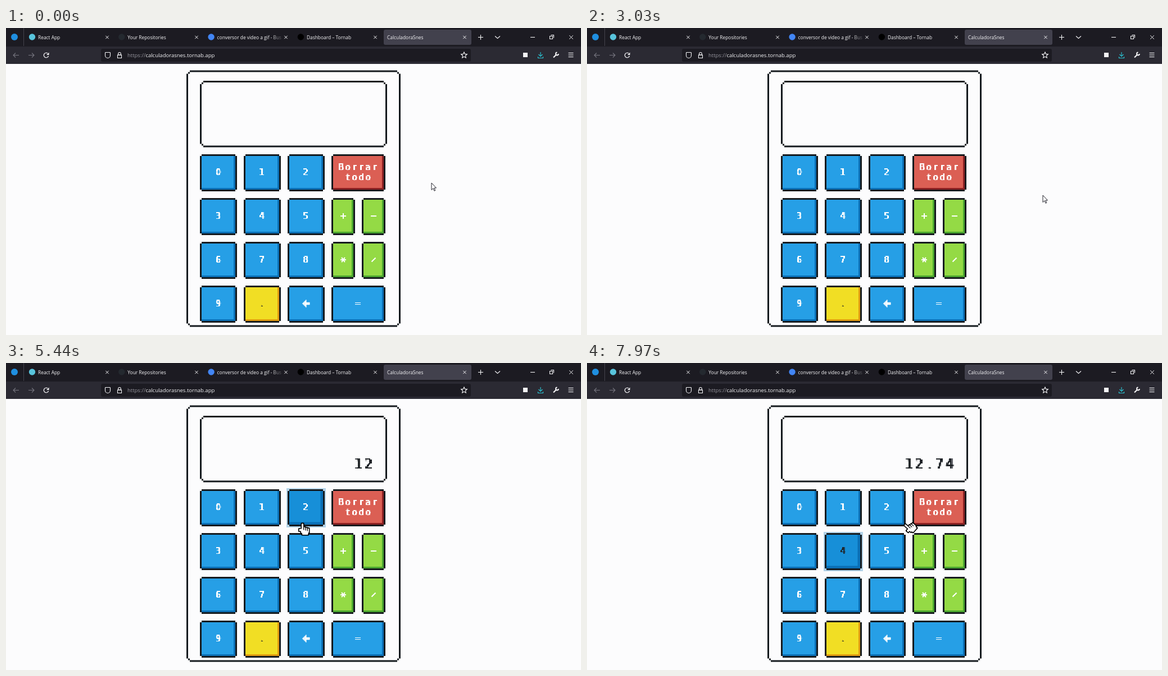
Write an HTML page with a canvas that moves like this. It is 1023x547 px and loops after 8 s.

```html
<!DOCTYPE html>
<html lang="es">
<head>
<meta charset="utf-8">
<title>Calculadora</title>
<style>
  html, body { margin: 0; width: 100%; height: 100%; overflow: hidden; background: #fcfcfd; }
  canvas { display: block; }
</style>
</head>
<body>
<canvas id="stage" width="1023" height="547"></canvas>
<script>
const ctx = document.getElementById('stage').getContext('2d');
const LOOP = 8000;
const INK = '#151a1e';
const DARK = '#212529';
const PALE = '#f4f4f6';

const THEMES = {
  blue: { fill: '#269fe6', hover: '#178fd8', shade: '#0a6fb5', halo: '#b3d3e9', text: '#fff' },
  red: { fill: '#db5f54', hover: '#ce5347', shade: '#8c2022', halo: '#e4c0bd', text: '#fff' },
  green: { fill: '#94da45', hover: '#7fc63a', shade: '#4aa52e', halo: '#c9e4c0', text: '#fff' },
  yellow: { fill: '#f1de24', hover: '#efc90f', shade: '#e09a10', halo: '#f6e3ba', text: DARK }
};

// Operators are bars through the centre, at these angles in degrees.
const BARS = { '+': [0, 90], '-': [0], '*': [0, 55, 125], '/': [-45] };

const PITCH = 78;
const SIZE = 66;
const buttons = [];
function addButton(label, col, row, theme = 'blue', w = SIZE) {
  buttons.push({ label, x: 345 + PITCH * col, y: 225 + PITCH * row, w, h: SIZE, theme });
}
for (let n = 0; n < 10; n++) addButton(String(n), n % 3, Math.floor(n / 3));
addButton('.', 1, 3, 'yellow');
addButton('←', 2, 3);
addButton('=', 3, 3, 'blue', 96);
addButton('Borrar todo', 3, 0, 'red', 96);
[...'+-*/'].forEach((op, i) => {
  addButton(op, 3 + (i % 2) * 54 / PITCH, 1 + Math.floor(i / 2), 'green', 42);
});

// Pointer stops: time, place and the key pressed on arrival
const stops = [
  { t: 530, x: 757, y: 276 },
  { t: 2030, x: 740, y: 170 },
  { t: 3030, x: 811, y: 298 },
  { t: 4470, x: 461, y: 294 },
  { t: 4770, x: 460, y: 264, key: '1' },
  { t: 5180, x: 526, y: 264, key: '2' },
  { t: 5440, x: 528, y: 285 },
  { t: 6400, x: 479, y: 481, key: '.' },
  { t: 6570, x: 479, y: 481 },
  { t: 6970, x: 460, y: 416, key: '7' },
  { t: 7410, x: 458, y: 342, key: '4' },
  { t: 7970, x: 568, y: 289 }
];

function pointerAt(t) {
  const i = stops.findIndex(s => s.t > t);
  if (i === 0) return stops[0];
  if (i < 0) return stops[stops.length - 1];
  const a = stops[i - 1], b = stops[i];
  const p = (t - a.t) / (b.t - a.t);
  const e = p * p * (3 - 2 * p);
  return { x: a.x + (b.x - a.x) * e, y: a.y + (b.y - a.y) * e };
}

function rect(x, y, w, h, color) {
  ctx.fillStyle = color;
  ctx.fillRect(x, y, w, h);
}

function round(x, y, w, h, r, color) {
  ctx.fillStyle = color;
  ctx.beginPath();
  ctx.roundRect(x, y, w, h, r);
  ctx.fill();
}

function dot(x, y, r, color) {
  round(x - r, y - r, 2 * r, 2 * r, r, color);
}

function path(points) {
  ctx.beginPath();
  points.forEach(([x, y]) => ctx.lineTo(x, y));
}

function stroke(color = PALE, width = 1.1) {
  ctx.strokeStyle = color;
  ctx.lineWidth = width;
  ctx.stroke();
}

function line(points, color, width) {
  path(points);
  stroke(color, width);
}

function arc(x, y, r, from, to, width) {
  ctx.beginPath();
  ctx.arc(x, y, r, from, to);
  stroke(PALE, width);
}

function box(x, y, w, h, radii = 0) {
  ctx.beginPath();
  ctx.roundRect(x, y, w, h, radii);
  stroke();
}

function at(x, y, angle, paint) {
  ctx.save();
  ctx.translate(x, y);
  ctx.rotate(angle * Math.PI / 180);
  paint();
  ctx.restore();
}

function text(str, x, y, size, color) {
  ctx.font = `${size}px "Open Sans", sans-serif`;
  ctx.fillStyle = color;
  ctx.fillText(str, x, y);
  return ctx.measureText(str).width;
}

// Renders a character on a coarse 8-unit cell, with stems thicker than bars.
const glyphs = new Map();
function glyph(ch, color) {
  const key = ch + color;
  if (glyphs.has(key)) return glyphs.get(key);
  const cell = document.createElement('canvas');
  cell.width = 10;
  cell.height = 12;
  const c = cell.getContext('2d');
  c.font = '9.8px "DejaVu Sans", sans-serif';
  c.textAlign = 'center';
  c.fillStyle = color;
  for (const shift of [-0.6, 0, 0.6]) c.fillText(ch, 4.6 + shift, 9);
  const img = c.getImageData(0, 0, 10, 12);
  for (let i = 3; i < img.data.length; i += 4) {
    img.data[i] = Math.max(0, Math.min(255, (img.data[i] - 100) * 2.2));
  }
  c.putImageData(img, 0, 0);
  glyphs.set(key, cell);
  return cell;
}

function pixelText(str, x, baseline, unit, color) {
  ctx.imageSmoothingEnabled = false;
  [...str].forEach((ch, i) => {
    ctx.drawImage(glyph(ch, color), x + (8 * i - 1) * unit, baseline - 9 * unit, 10 * unit, 12 * unit);
  });
}

function cross(x, y, r) {
  for (const s of [-1, 1]) line([[x - r, y - s * r], [x + r, y + s * r]], PALE, 1);
}

function tab(title, icon, x) {
  const fade = ctx.createLinearGradient(x + 96, 0, x + 118, 0);
  fade.addColorStop(0, PALE);
  fade.addColorStop(1, 'rgba(244,244,246,0)');
  if (icon) dot(x - 10.5, 16, 5.7, icon);
  text(title, x, 20, 8.4, fade);
}

function tabBar() {
  rect(0, 0, 1023, 33, '#1c1b22');
  rect(31, 0, 1, 32, '#45444d');
  dot(15, 16, 6, '#1f8fe0');
  round(672, 3, 156, 27, 3, '#42414d');
  const tabs = [
    ['React App', '#58c4dc'], ['Your Repositories', '#24292f'],
    ['conversor de video a gif - Bus', '#4285f4'], ['Dashboard – Tornab', '#000'],
    ['CalculadoraSnes']
  ];
  tabs.forEach(([title, icon], i) => {
    tab(title, icon, icon ? 57 + 159.3 * i : 678);
    cross(180 + 159 * i, 16.5, 2.7);
  });

  for (const turn of [0, 90]) at(844.5, 16.5, turn, () => line([[-4.5, 0], [4.5, 0]]));
  line([[870, 14.5], [874.5, 18.5], [879, 14.5]]);
  line([[933, 16.5], [941, 16.5]]);
  box(967.5, 14.5, 5, 5);
  line([[969.5, 12.5], [974.5, 12.5], [974.5, 17.5]]);
  cross(1005.5, 16.5, 3.3);
}

function toolbar() {
  rect(0, 33, 1023, 31, '#2b2a33');
  round(169, 37, 658, 23, 3, '#1c1b22');
  [18, 45].forEach((x, i) => at(x, 48.5, 180 * i, () => {
    line([[5, 0], [-5, 0]], '#75747d');
    line([[-1, -4], [-5, 0], [-1, 4]], '#75747d');
  }));

  arc(71.5, 48.5, 4.2, 0.3, 5.3, 1.3);
  path([[76.5, 43.5], [76.5, 48], [72, 48]]);
  ctx.fillStyle = PALE;
  ctx.fill();

  box(176.5, 43.5, 9, 10, [1, 1, 5, 5]);
  box(198.5, 48, 7, 5.5);
  box(199.7, 43.5, 4.6, 4.5, [2.3, 2.3, 0, 0]);

  const end = 216 + text('https://', 216, 52, 9.5, '#96959e');
  text('calculadorasnes.tornab.app', end, 52, 9.5, PALE);

  path(Array.from({ length: 10 }, (_, i) => {
    const a = (i / 5 - 0.5) * Math.PI;
    const r = i % 2 ? 2.6 : 5.6;
    return [815 + r * Math.cos(a), 48.5 + r * Math.sin(a)];
  }));
  ctx.closePath();
  stroke();

  const teal = '#2bc8d8';
  rect(920, 44, 8, 8, PALE);
  line([[951, 43], [951, 50.5]], teal);
  line([[947.5, 47], [951, 50.5], [954.5, 47]], teal);
  line([[946.5, 51], [946.5, 53.5], [955.5, 53.5], [955.5, 51]], teal);
  line([[974, 52.5], [979.5, 47]], PALE, 2.2);
  arc(980.5, 46, 2.4, 0, 4.7, 2);
  for (const y of [44.5, 48, 51.5]) line([[1000.5, y], [1009.5, y]]);
}

function steppedFrame(x, y, w, h) {
  for (const top of [y, y + h - 3]) rect(x + 6, top, w - 12, 3, INK);
  for (const left of [x, x + w - 3]) rect(left, y + 6, 3, h - 12, INK);
  for (const cx of [x + 3, x + w - 6]) {
    for (const cy of [y + 3, y + h - 6]) rect(cx, cy, 3, 3, INK);
  }
}

function leftArrow(color) {
  for (let i = 0; i < 5; i++) rect(-7 + 1.5 * i, -1.5 * i - 0.75, 1.5, 3 * i + 1.5, color);
  rect(0, -2.25, 6.5, 4.5, color);
}

function drawLabel({ label, x, y, w }, color) {
  const cx = x + w / 2;
  const cy = y + 32;
  if (label === '←') {
    at(cx, cy, 0, () => leftArrow(color));
  } else if (BARS[label]) {
    for (const angle of BARS[label]) at(cx, cy, angle, () => rect(-5, -1, 10, 2, color));
  } else {
    const rows = label.split(' ');
    rows.forEach((row, i) => {
      pixelText(row, cx - 6 * row.length, cy + 14 - 9 * rows.length + 18 * i, 1.5, color);
    });
  }
}

function drawButton(b, hovered, focused, pressed) {
  const { x, y, w, h } = b;
  const theme = THEMES[b.theme];
  const lit = hovered || focused;
  const edge = lit ? 4.5 : 3;
  const shift = pressed ? edge : 0;
  if (focused) rect(x - 2, y - 2, w + 4, h + 4, theme.halo);
  rect(x + 3, y, w - 6, h, INK);
  rect(x, y + 3, w, h - 6, INK);
  rect(x + 3, y + 3, w - 6, h - 6, theme.shade);
  rect(x + 3 + shift, y + 3 + shift, w - 6 - edge, h - 6 - edge, lit ? theme.hover : theme.fill);
  drawLabel(b, focused && !hovered ? DARK : theme.text);
}

function arrow() {
  path([[0, 0], [0, 12.5], [3, 9.7], [5, 14.3], [6.8, 13.4], [4.8, 9], [8.5, 9]]);
  ctx.closePath();
  ctx.fillStyle = '#fff';
  ctx.fill();
  stroke('#22222c', 1);
}

// Index finger, three folded fingers, thumb and palm, inked then filled.
function hand() {
  const parts = [[-2, 1, 3, 14], [-6.5, 10.5, 6, 4], [-3, 13, 13, 5], [-1, 15, 10.5, 6]];
  for (let i = 0; i < 3; i++) parts.push([1 + 3.3 * i, 7.5 + i, 3.3, 8]);
  for (const grow of [1.6, 0]) {
    for (const [x, y, w, h] of parts) {
      round(x - grow, y - grow, w + 2 * grow, h + 2 * grow, 1.5, grow ? '#000' : '#fff');
    }
  }
  for (let i = 0; i < 3; i++) rect(1 + 3.3 * i, 7.5 + i, 1.2, 5, '#000');
}

function drawCursor({ x, y }, overButton, overBody) {
  if (overButton) at(x, y, 0, hand);
  else if (overBody) at(x - 3, y - 2, -48, hand);
  else at(x, y, 0, arrow);
}

const inside = (p, b) => p.x >= b.x && p.x < b.x + b.w && p.y >= b.y && p.y < b.y + b.h;
const body = { x: 321, y: 75.5, w: 381, h: 457 };

function draw(t) {
  const pointer = pointerAt(t);
  const pressed = stops.filter(s => s.key && s.t <= t);
  const last = pressed[pressed.length - 1];
  const entry = pressed.map(s => s.key).join('');
  const target = buttons.find(b => inside(pointer, b));

  rect(0, 0, 1023, 547, '#fcfcfd');
  tabBar();
  toolbar();
  steppedFrame(body.x, body.y, body.w, body.h);
  steppedFrame(345, 94, 333, 118.5);
  pixelText(entry, 655 - 18 * entry.length, 188, 2.25, DARK);
  for (const b of buttons) {
    const focused = !!last && last.key === b.label;
    drawButton(b, b === target, focused, focused && t - last.t < 90);
  }
  drawCursor(pointer, !!target, inside(pointer, body));
}

const start = performance.now();
function frame() {
  draw((performance.now() - start) % LOOP);
  requestAnimationFrame(frame);
}
frame();
</script>
</body>
</html>
```
